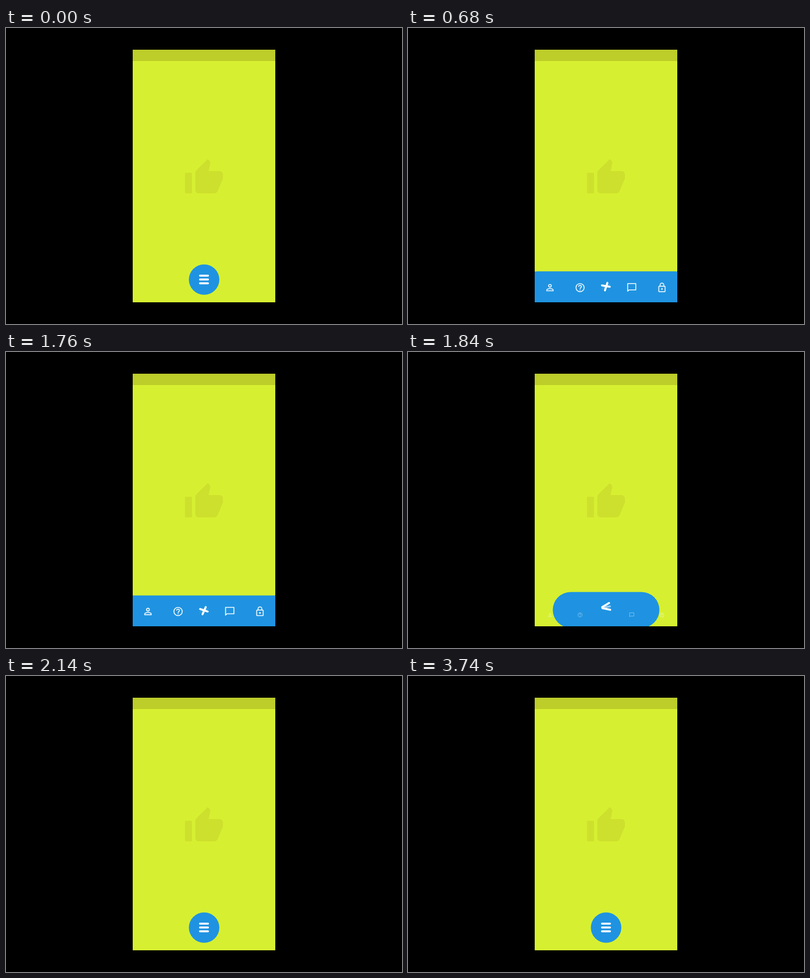
Write an HTML page that moves like this. It is 800 by 600 pixels and loops after 3.76 s.

```html
<!DOCTYPE html>
<html lang="en">
<head>
<meta charset="utf-8">
<title>Expanding menu</title>
<style>
  html, body { margin: 0; height: 100%; overflow: hidden; background: #000; }
  svg { display: block; width: 100%; height: 100%; }
</style>
</head>
<body>
<svg viewBox="0 0 800 600">
  <clipPath id="screen"><path d="M256 44h288v512H256z"/></clipPath>
  <g clip-path="url(#screen)">
    <path fill="#d6f031" d="M256 44h288v512H256z"/>
    <path fill="#bdcd29" d="M256 44h288v23H256z"/>
    <path fill="#cde02d" transform="translate(358.2 262.2) scale(3.48)" d="M1 21h4V9H1v12zm22-11c0-1.1-.9-2-2-2h-6.31l.95-4.57.03-.32c0-.41-.17-.79-.44-1.06L14.17 1 7.59 7.59C7.22 7.95 7 8.45 7 9v10c0 1.1.9 2 2 2h9c.83 0 1.54-.5 1.84-1.22l3.02-7.05c.09-.23.14-.47.14-.73z"/>
    <rect id="pill" fill="#1f93e1"/>
    <g id="icons" fill="none" stroke="#fff" stroke-width="2">
      <g data-x="286.8">
        <circle cy="-4" r="3"/>
        <path d="M-7 7V5C-7 3-2.5 2 0 2s7 1 7 3v2z"/>
      </g>
      <g data-x="347.6">
        <circle r="9"/>
        <path d="M-3-2a3 3 0 0 1 6 0C3 0 0 .2 0 3M0 4v2"/>
      </g>
      <g data-x="452">
        <path stroke-linejoin="round" d="M-9 8V-9H9V5H-6z"/>
      </g>
      <g data-x="513">
        <rect x="-7" y="-3" width="14" height="12" rx="1"/>
        <path d="M-4-3v-3a4 4 0 0 1 8 0v3"/>
        <circle cy="3" r="2" fill="#fff" stroke="none"/>
      </g>
    </g>
    <g id="burger" stroke="#fff" stroke-width="4" stroke-linecap="round">
      <path d="M-8 0H8"/>
      <path d="M-8 0H8"/>
      <path d="M-8 0H8"/>
    </g>
  </g>
</svg>
<script>
const LOOP = 3760, STEP = 20, DURATION = 352, OPEN = 452, CLOSE = 1732;
const pill = document.getElementById('pill');
const burger = document.getElementById('burger');
const bars = burger.children;
const icons = document.getElementById('icons').children;

const set = (el, attrs) => {
  for (const name in attrs) el.setAttribute(name, attrs[name]);
};
const mix = (a, b, p) => a + (b - a) * p;

// cubic-bezier(.25, .1, .25, 1), solved by bisection
function ease(x) {
  if (x <= 0) return 0;
  if (x >= 1) return 1;
  let lo = 0, hi = 1, s;
  for (let i = 0; i < 24; i++) {
    s = (lo + hi) / 2;
    if (.75 * s * (1 - s) + s ** 3 < x) lo = s; else hi = s;
  }
  return .3 * s * (1 - s) ** 2 + 3 * s * s * (1 - s) + s ** 3;
}

function draw(t) {
  const p = ease((t - OPEN) / DURATION) - ease((t - CLOSE) / DURATION);

  const width = mix(61.6, 386.6, p), height = mix(61.6, 85, p);
  set(pill, {
    x: 400.2 - width / 2, y: mix(510, 537, p) - height / 2,
    width, height, rx: height / 2
  });

  set(burger, { transform: `translate(400 ${mix(509.7, 525, p)}) rotate(${360 * p})` });
  [-1, 0, 1].forEach((side, i) => set(bars[i], {
    transform: `translate(0 ${side * mix(7.7, 0, p)}) rotate(${-45 * side * p})`,
    opacity: side ? 1 : 1 - p
  }));

  for (const icon of icons) set(icon, {
    transform: `translate(${icon.dataset.x} ${mix(540, 525, p)}) scale(${p})`,
    opacity: p
  });
}

const start = performance.now();
function frame() {
  const t = (performance.now() - start) % LOOP;
  draw(Math.floor(t / STEP) * STEP);
  requestAnimationFrame(frame);
}
frame();
</script>
</body>
</html>
```
